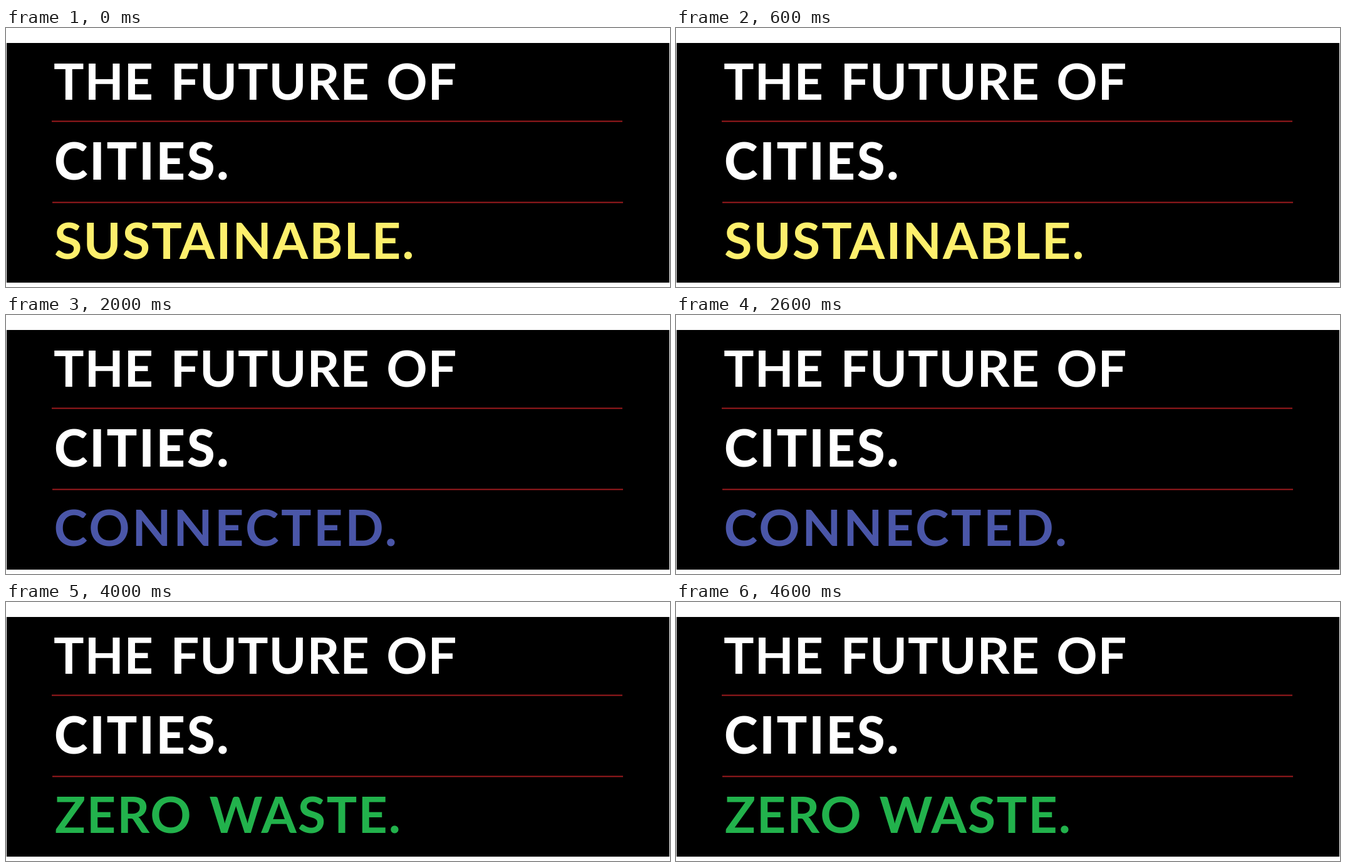
These frames come from a looping animation (1060x415 px, 5 s). An HTML page:

```html
<!DOCTYPE html>
<html lang="en">
<head>
<meta charset="utf-8">
<title>The future of cities</title>
<style>
  html, body { margin: 0; width: 100%; height: 100%; overflow: hidden; background: #fff; }
  svg { display: block; width: 1060px; height: 415px; }
  text { font: 700 81px Lato, sans-serif; word-spacing: 6px; fill: #fff; }
  line { stroke: #9e1b1e; stroke-width: 2; }
  .heavy { font-weight: 800; }
</style>
</head>
<body>
<svg viewBox="0 0 1060 415">
  <rect x="1" y="24" width="1058" height="384"/>
  <text x="76" y="115" letter-spacing="0.8">THE FUTURE OF</text>
  <line x1="73" y1="149.5" x2="984" y2="149.5"/>
  <text x="77" y="243" letter-spacing="2.8" class="heavy">CITIES.</text>
  <line x1="74" y1="279.5" x2="985" y2="279.5"/>
  <text id="word" y="370"></text>
</svg>
<script>
const HOLD = 1000;
const words = [
  { text: 'SUSTAINABLE.', fill: '#fdef6c', x: 77, gap: 2.05 },
  { text: 'SMART.', fill: '#4599d6', x: 77, gap: 1.7 },
  { text: 'CONNECTED.', fill: '#4a56a8', x: 76.5, gap: 3.5 },
  { text: 'PLANNED.', fill: '#f26553', x: 73, gap: 2.7 },
  { text: 'ZERO WASTE.', fill: '#22b24c', x: 78, gap: 1.8 }
];
const label = document.getElementById('word');
let shown;

function draw(time) {
  const word = words[Math.floor(time / HOLD) % words.length];
  if (word === shown) return;
  shown = word;
  label.textContent = word.text;
  label.style.fill = word.fill;
  label.setAttribute('x', word.x);
  label.setAttribute('letter-spacing', word.gap);
}

function tick() {
  draw(performance.now());
  requestAnimationFrame(tick);
}
tick();
</script>
</body>
</html>
```
